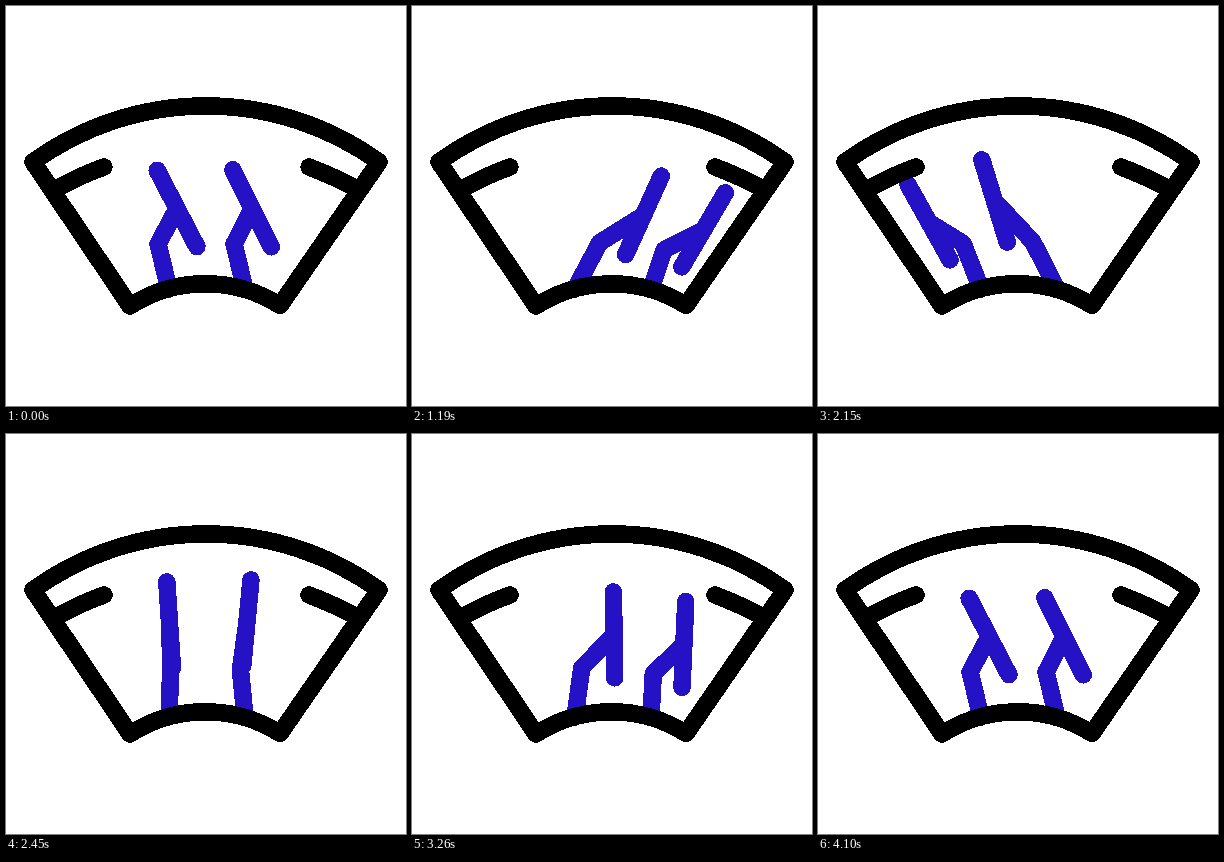
An HTML page that plays this animation: 400x400 px, repeating every 4130 ms.

```html
<!DOCTYPE html>
<html lang="en">
<head>
<meta charset="utf-8">
<title>Windscreen wipers</title>
<style>
  html, body { margin: 0; width: 100%; height: 100%; overflow: hidden; background: #fff; }
  svg { display: block; width: 100vw; height: 100vh; shape-rendering: crispEdges; }
  path { fill: none; stroke-width: 17.5; stroke-linecap: round; stroke-linejoin: round; }
  .wiper { stroke: #2412c4; }
  .glass { stroke: #000; }
</style>
</head>
<body>
<svg viewBox="0 0 400 400">
  <path class="wiper"/>
  <path class="wiper"/>
  <path class="glass" d="M27 156A295 295 0 0 1 373 156L274 299.5A139 139 0 0 0 124 300Z"/>
  <path class="glass" d="M50 183Q73 170 98 161M351 183Q327 170 303 161"/>
</svg>
<script>
const LOOP = 4130, HOLD = 500, STEP = 30, HALF_BLADE = 43;

// Pose: blade pivot angle and radius, elbow angle and radius (both around the base), blade tilt
const wipers = [
  { base: [163, 283],
    rest:  [5.7, 80.9, -13.7, 46.3, -27.5],
    right: [45.4, 101.1, 29.6, 52.7, 26.1],
    left:  [-44.6, 83.2, -25.5, 48.5, -33.6] },
  { base: [239, 283],
    rest:  [5, 81, -13.7, 46.3, -26.5],
    right: [44, 78.3, 19.9, 40.8, 31.9],
    left:  [-41.7, 110.3, -30.9, 54.1, -21] }
];

const smooth = bezier(1 / 3, 2 / 3);
const settle = bezier(1 / 3, 0.13);

// Start step, end step, poses and easing
const moves = [
  [0, 20, 'rest', 'right', smooth],
  [20, 50, 'right', 'left', smooth],
  [50, 80, 'left', 'right', smooth],
  [80, 120, 'right', 'rest', settle]
];

// cubic-bezier(x1, 0, x2, 1), solved by bisection
function bezier(x1, x2) {
  return x => {
    let lo = 0, hi = 1;
    for (let i = 0; i < 24; i++) {
      const s = (lo + hi) / 2, r = 1 - s;
      if (3 * r * r * s * x1 + 3 * r * s * s * x2 + s * s * s < x) lo = s; else hi = s;
    }
    return lo * lo * (3 - 2 * lo);
  };
}

function polar([x, y], deg, r) {
  const a = deg * Math.PI / 180;
  return [x + r * Math.sin(a), y - r * Math.cos(a)];
}

function outline(base, [pivotDeg, pivotR, elbowDeg, elbowR, tilt]) {
  const pivot = polar(base, pivotDeg, pivotR);
  const elbow = polar(base, elbowDeg, elbowR);
  const top = polar(pivot, tilt, HALF_BLADE);
  const bottom = polar(pivot, tilt, -HALF_BLADE);
  return `M${base}L${elbow}L${pivot}M${top}L${bottom}`;
}

const paths = document.querySelectorAll('.wiper');

function draw(ms) {
  const step = Math.max(0, Math.floor((ms - HOLD) / STEP));
  const [start, end, from, to, ease] = moves.find(m => step <= m[1]) || moves[3];
  const p = ease(Math.min(1, (step - start) / (end - start)));
  wipers.forEach((w, i) => {
    const pose = w[from].map((v, j) => v + (w[to][j] - v) * p);
    paths[i].setAttribute('d', outline(w.base, pose));
  });
}

const begin = performance.now();
function tick() {
  draw((performance.now() - begin) % LOOP);
  requestAnimationFrame(tick);
}
tick();
</script>
</body>
</html>
```
